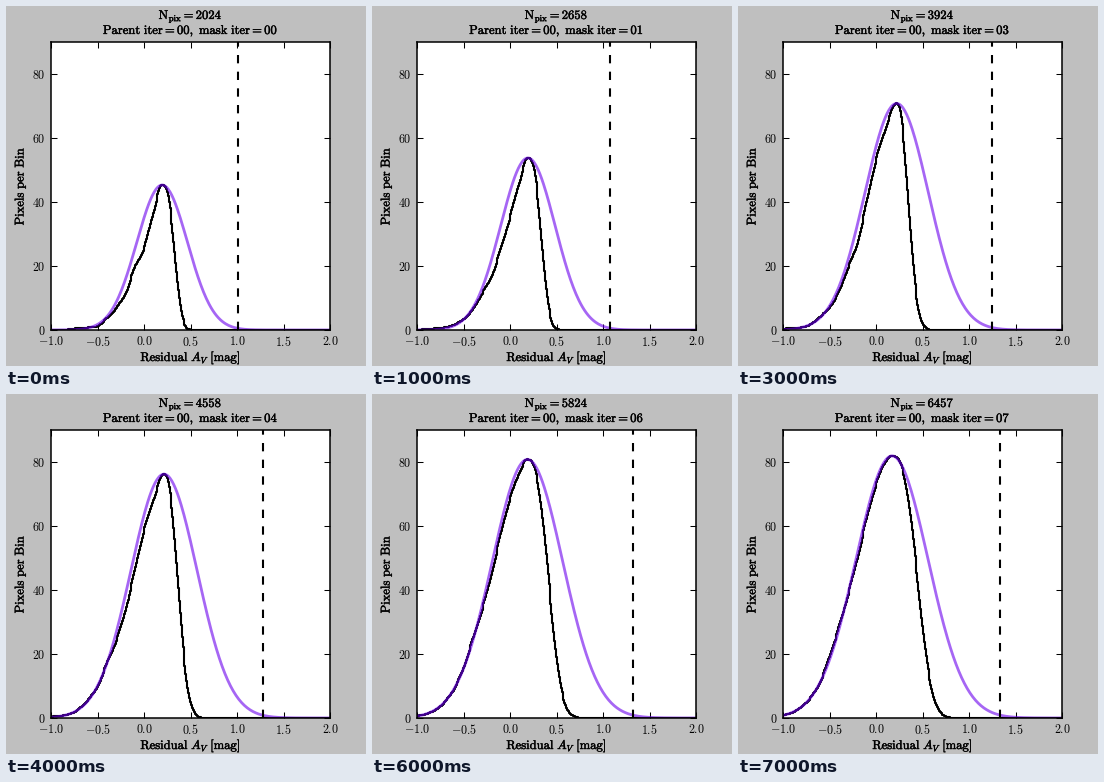
Animation, 360 px wide and 360 px high, one loop 8000 ms. Source, as a matplotlib script:

```python
import numpy as np
import matplotlib.pyplot as plt
from matplotlib import patheffects
from matplotlib.animation import FuncAnimation

SIZE, DPI = 360, 100
PT = 72 / DPI  # points per pixel
STEPS = 8
VIOLET = (0.42, 0.0, 0.93)

plt.rcParams.update({"mathtext.fontset": "cm", "axes.unicode_minus": True})

# Shape of the distribution at a few iterations; the rest is interpolated.
KEY_ITERS = [0, 2, 3, 4, 5, 7]
MEAN = [0.195, 0.19, 0.222, 0.215, 0.204, 0.172]
SIGMA = [0.272, 0.313, 0.341, 0.355, 0.369, 0.387]
PEAK = [45.3, 62.2, 70.8, 76.2, 79.7, 81.9]
HALF_X = [0.335, 0.353, 0.360, 0.376, 0.394, 0.455]
POWER = [2.8, 2.7, 2.3, 2.4, 2.5, 2.8]

# Pixel counts on the rising side, from -1.0 to 0.1.
RISE_X = np.linspace(-1, 0.1, 12)
RISE = np.array([
    [0, 0, 0.2, 0.7, 0.8, 1.2, 3.6, 6.8, 11.2, 19.5, 25.5, 36.5],
    [0.1, 0.5, 0.8, 0.9, 2.5, 5.5, 9.2, 16, 22, 31, 45, 55.5],
    [0.3, 0.7, 0.8, 1.8, 4.2, 7, 11.8, 19.5, 27, 40, 53, 62.5],
    [0.4, 0.7, 1.2, 2.8, 5.8, 9.7, 17, 24, 33.5, 46, 58.5, 68],
    [0.5, 0.8, 1.5, 3.7, 7, 12, 20.8, 29, 39.5, 52.5, 64, 73],
    [0.8, 1.7, 3.5, 6.5, 11.2, 19.2, 28.3, 38.5, 49.8, 62.3, 72.8, 80],
])

X = np.linspace(-1, 2, 301)


def at(values, i):
    return np.interp(i, KEY_ITERS, values)


def hermite(x, xs, ys):
    """Smooth curve through the points, flat at the last one."""
    slopes = np.gradient(ys, xs)
    slopes[-1] = 0
    k = np.clip(np.searchsorted(xs, x) - 1, 0, len(xs) - 2)
    h = xs[k + 1] - xs[k]
    t = (x - xs[k]) / h
    return (ys[k] * (1 + 2 * t) * (1 - t) ** 2
            + ys[k + 1] * t ** 2 * (3 - 2 * t)
            + h * t * (1 - t) * (slopes[k] * (1 - t) - slopes[k + 1] * t))


def histogram(i):
    mu, peak = at(MEAN, i), at(PEAK, i)
    rise = [at(column, i) for column in RISE.T]
    left = hermite(np.minimum(X, mu), np.append(RISE_X, mu), np.append(rise, peak))
    d = np.maximum(X - mu, 0) / (at(HALF_X, i) - mu)
    return np.where(X < mu, left, peak * 0.5 ** d ** at(POWER, i))


fig = plt.figure(figsize=(SIZE / DPI, SIZE / DPI), dpi=DPI, facecolor="0.75")
ax = fig.add_axes([0.125, 0.1, 0.775, 0.8])
ax.set(xlim=(-1, 2), ylim=(0, 90))
ax.set_xticks(np.arange(-1, 2.1, 0.5))
ax.set_yticks(range(0, 81, 20))
ax.set_xticklabels([f"${v:.1f}$" for v in ax.get_xticks()])
ax.set_yticklabels([f"${v}$" for v in range(0, 81, 20)])
ax.tick_params(direction="in", top=True, right=True, length=4, width=0.75,
               labelsize=12 * PT, pad=5 * PT)
for spine in ax.spines.values():
    spine.set_linewidth(1.1)


def label(x, y, text="", **kw):
    t = fig.text(x / SIZE, 1 - y / SIZE, text, fontsize=12.6 * PT, ha="center",
                 **{"va": "baseline", **kw})
    t.set_path_effects([patheffects.withStroke(linewidth=0.3, foreground="k")])
    return t


count = label(184.5, 13)
status = label(184.5, 28)
label(184.5, 355, r"$\mathrm{Residual}\ A_V\ \mathrm{[mag]}$")
label(14, 180, r"$\mathrm{Pixels\ per\ Bin}$", rotation=90, va="center")

bars, = ax.plot([], [], "k", lw=1.5, drawstyle="steps-mid")
fit, = ax.plot([], [], color=VIOLET, alpha=0.6, lw=2)
cut = ax.axvline(1, color="k", lw=1.5, dashes=(4, 4))


def draw(i):
    mu, sigma = at(MEAN, i), at(SIGMA, i)
    bars.set_data(X, histogram(i))
    fit.set_data(X, at(PEAK, i) * np.exp(-0.5 * ((X - mu) / sigma) ** 2))
    cut.set_xdata([mu + 3 * sigma] * 2)
    pixels = int(2024.85 + 633.3 * i)
    count.set_text(rf"$\mathrm{{N_{{pix}}}} = {pixels}$")
    status.set_text(rf"$\mathrm{{Parent\ iter}} = \mathrm{{00,\ mask\ iter}} = {i:02d}$")
    return bars, fit, cut, count, status


anim = FuncAnimation(fig, draw, frames=STEPS, interval=1000, repeat=True,
                     init_func=lambda: draw(0))
plt.show()
```
